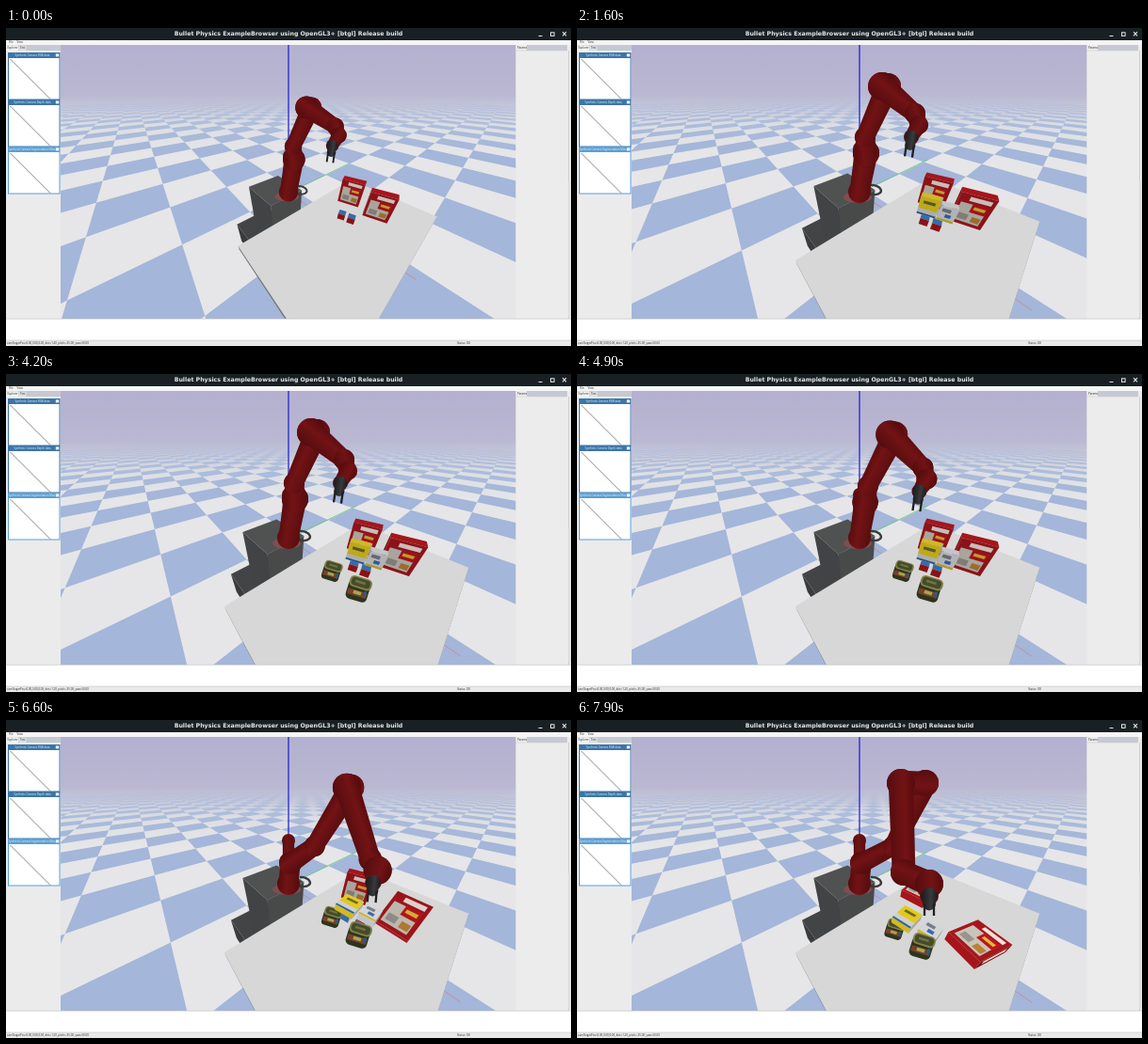
Write an HTML page with a canvas that moves like this. It is 600 px wide and 338 px high and loops after 8000 ms.

```html
<!DOCTYPE html>
<html lang="en">
<head>
<meta charset="utf-8">
<title>Physics browser</title>
<style>
html, body { margin: 0; width: 600px; height: 338px; overflow: hidden; background: #fff; }
canvas { display: block; width: 600px; height: 338px; }
</style>
</head>
<body>
<canvas id="stage"></canvas>
<script>
const LOOP = 8000, W = 600, H = 338;
const stage = document.getElementById('stage');
const c = stage.getContext('2d');
const dpr = Math.max(1, window.devicePixelRatio || 1);
stage.width = W * dpr;
stage.height = H * dpr;

// Camera: orbit around the origin, 90 degree field of view
const CX = 300, CY = 175, FOCAL = 163, NEAR_DIST = 1.2, FLOOR = -0.93;
const rad = Math.PI / 180;
const sinP = Math.sin(35 * rad), cosP = Math.cos(35 * rad);
const sinY = Math.sin(50 * rad), cosY = Math.cos(50 * rad);
let dist = NEAR_DIST;

const lerp = (a, b, k) => a + (b - a) * k;
const mix = (a, b, k) => a.map((v, i) => lerp(v, b[i], k));
const clamp = (v, lo = 0, hi = 1) => Math.min(hi, Math.max(lo, v));
const part = (t, from, to) => clamp((t - from) / (to - from));
const smooth = k => k * k * (3 - 2 * k);

// View-aligned ground coordinates: right, ahead, up
function view([r, g, z]) {
  const depth = Math.max(0.05, dist + g * cosP - z * sinP);
  const k = FOCAL / depth;
  return [CX + r * k, CY - (g * sinP + z * cosP) * k, depth];
}

const project = (x, y, z) => view([x * cosY + y * sinY, y * cosY - x * sinY, z]);

// Scale about the centre for a point placed at the nearest camera distance
const zoom = depth => depth / (depth + dist - NEAR_DIST);

function poly(points, fill) {
  c.beginPath();
  points.forEach(p => c.lineTo(p[0], p[1]));
  c.closePath();
  c.fillStyle = fill;
  c.fill();
}

function line(a, b, color, width) {
  c.beginPath();
  c.moveTo(a[0], a[1]);
  c.lineTo(b[0], b[1]);
  c.strokeStyle = color;
  c.lineWidth = width;
  c.stroke();
}

function rect(x, y, w, h, fill) {
  c.fillStyle = fill;
  c.fillRect(x, y, w, h);
}

function disc([x, y, r], fill) {
  c.beginPath();
  c.arc(x, y, r, 0, 7);
  c.fillStyle = fill;
  c.fill();
}

function label(str, x, y, font, fill = '#2a2a2a', align = 'left') {
  c.font = font;
  c.fillStyle = fill;
  c.textAlign = align;
  c.textBaseline = 'middle';
  c.fillText(str, x, y);
}

function ramp(x0, y0, x1, y1, ...stops) {
  const g = c.createLinearGradient(x0, y0, x1, y1);
  stops.forEach(([at, color]) => g.addColorStop(at, color));
  return g;
}

function drawFloor() {
  rect(58, 18, 484, 56, ramp(0, 18, 0, 74, [0, '#b4b0d0'], [1, '#bab8d2']));
  rect(58, 72, 484, 238, ramp(0, 72, 0, 135,
    [0, '#bab9d2'], [0.15, '#c2c4d8'], [0.5, '#dcdee4'], [1, '#e6e6e8']));
  for (let i = -28; i < 28; i++) {
    for (let j = -28; j < 28; j++) {
      if ((i + j) % 2 === 0) continue;
      const depth = project(i + 0.5, j + 0.5, FLOOR)[2];
      if (depth <= 0.06 || depth > 22) continue;
      c.globalAlpha = clamp(1.25 - depth / 18);
      poly([[i, j], [i + 1, j], [i + 1, j + 1], [i, j + 1]]
        .map(([x, y]) => project(x, y, FLOOR)), '#a4b6d9');
    }
  }
  c.globalAlpha = 1;
}

function block(x0, x1, y0, y1, z0, z1, left, front, top) {
  const p = project;
  poly([p(x0, y0, z0), p(x1, y0, z0), p(x1, y0, z1), p(x0, y0, z1)], left);
  poly([p(x1, y0, z0), p(x1, y1, z0), p(x1, y1, z1), p(x1, y0, z1)], front);
  poly([p(x0, y0, z1), p(x1, y0, z1), p(x1, y1, z1), p(x0, y1, z1)], top);
}

function drawStand() {
  block(-0.55, 0, -0.37, 0.1, FLOOR, -0.61, '#3a3b3c', '#424344', '#434445');
  block(-0.32, 0.05, -0.23, 0.12, FLOOR, 0, '#424344', '#484949', '#505151');
  const s = zoom(1.15);
  c.save();
  c.translate(CX, CY);
  c.scale(s, s);
  c.beginPath();
  c.ellipse(14, -3, 9, 5, 0.15, -1.9, 1.9);
  c.strokeStyle = '#3b3b3d';
  c.lineWidth = 2.4;
  c.stroke();
  c.beginPath();
  c.ellipse(-2, 5, 15, 6, 0, 0, 7);
  c.fillStyle = '#7c4f50';
  c.fill();
  c.restore();
}

function drawTable() {
  block(0.24, 0.95, -0.6, 0.64, -0.03, 0.005, '#77787a', '#8b8c8d', '#d7d7d7');
}

const RED = ['#550b0d', '#721315', '#641012'];
const DARK = ['#1b1b1d', '#3a3a3d', '#28282a'];

function limb(a, b, tones) {
  const dx = b[0] - a[0], dy = b[1] - a[1], len = Math.hypot(dx, dy) || 1;
  const nx = -dy / len, ny = dx / len, r = Math.max(a[2], b[2]);
  const mx = (a[0] + b[0]) / 2, my = (a[1] + b[1]) / 2;
  const fill = ramp(mx - nx * r, my - ny * r, mx + nx * r, my + ny * r,
    [0, tones[0]], [0.4, tones[1]], [0.7, tones[2]], [1, tones[0]]);
  const edge = (p, k) => [p[0] + nx * p[2] * k, p[1] + ny * p[2] * k];
  disc(a, fill);
  disc(b, fill);
  poly([edge(a, 0.88), edge(b, 0.88), edge(b, -0.88), edge(a, -0.88)], fill);
}

// The arm swings down to the boxes, then pulls back and folds
function drawArm(t) {
  const swing = smooth(part(t, 4600, 5700)), pull = part(t, 5700, 7900);
  const fold = pull * pull;
  const path = (up, reach, end) => mix(mix(up, reach, swing), end, pull);
  const shoulder = mix([307, 133], [302, 152], swing);
  const middle = path([306, 116], [322, 134], [336, 134]);
  const elbow = path([327, 62], [369, 75], [357, 67]);
  const wrist = path([363, 103], [409, 150], [374, 174]);
  const lean = 1 - pull;
  const from = ([x, y], dx, dy) => [x + dx, y + dy];
  const place = ([x, y], r, depth) => {
    const s = zoom(depth);
    return [CX + (x - CX) * s, CY + (y - CY) * s, r * s];
  };

  const spread = 13 * fold + 3 * (1 - swing);
  const joints = [
    place([300, 174], 12, 1.18),
    place(shoulder, lerp(14, 12, swing), 1.05),
    place(middle, 11, 1),
    place(from(elbow, spread, 0), 14, 0.8),
    place(from(elbow, -spread, 0), 15, 0.8),
    place(from(wrist, -4 - 23 * fold, -12), 11 + 3 * pull, 1.05),
    place(wrist, lerp(10, 15, swing), 1.1)
  ];
  const hand = place(from(wrist, -8 * lean, 13), 8 + pull * 2, 1.1);
  const tip = place(from(wrist, -11 * lean, 34), 0, 1.1);

  const s = zoom(1.05);
  limb([CX, CY - 24 * s, 7 * s], [CX, CY - 47 * s, 7 * s], RED);
  for (let n = 1; n < joints.length; n++) limb(joints[n - 1], joints[n], RED);

  // Wrist, dark hand and two fingers
  const dx = tip[0] - hand[0], dy = tip[1] - hand[1], len = Math.hypot(dx, dy);
  const grip = [hand[0] + dx * 0.4, hand[1] + dy * 0.4];
  limb(joints[6], hand, RED);
  limb([hand[0], hand[1], hand[2] * 0.9], [...grip, hand[2] * 0.7], DARK);
  for (const side of [-0.5, 0.5]) {
    const ox = -dy / len * side * hand[2], oy = dx / len * side * hand[2];
    line(from(grip, ox, oy), from(tip, ox, oy), '#202022', 2.3 * s);
  }
}

// Panels on a front face in unit coordinates: x, y, w, h, colour
const PACKET_ART = [
  [0.1, 0.28, 0.78, 0.62, '#c9c4bb'], [0.3, 0.07, 0.6, 0.13, '#eee0dc'],
  [0.45, 0.26, 0.45, 0.28, '#bd161c'], [0.52, 0.34, 0.32, 0.1, '#e2b83c'],
  [0.18, 0.62, 0.3, 0.2, '#98948e'], [0.6, 0.66, 0.25, 0.18, '#b98134']];
const CARTON_ART = [
  [0, 0, 1, 0.65, '#e2c91f'], [0.2, 0.2, 0.6, 0.16, '#6a6a2a'], [0, 0.9, 1, 0.1, '#2b62a8']];
const SUGAR_ART = [
  [0.15, 0.15, 0.5, 0.22, '#777c88'], [0.4, 0.5, 0.35, 0.22, '#3a69b0'], [0, 0.86, 1, 0.14, '#d0b52c']];

// Each box stands at one place and tips over onto its back at another
const packet = {
  size: [0.164, 0.213, 0.06], colors: ['#7d1014', '#a5161b', '#a5171c'], art: PACKET_ART, spine: '#eee2dd'
};
const cube = { size: [0.048, 0.048, 0.048], colors: ['#b9bcc0', '#356ba9', '#a3161a'], art: [], tip: [5700, 6600] };
const leftPacket = { ...packet, from: [0.503, -0.137, 0.106], to: [0.42, -0.13, 0.03], yaw: [-31, -45], tip: [6600, 7800] };
const rightPacket = { ...packet, from: [0.643, -0.312, 0.106], to: [0.57, -0.53, 0.03], yaw: [-31, -68], tip: [5500, 7500] };
const cubes = [
  { ...cube, from: [0.39, -0.32, 0.025], to: [0.27, -0.4, 0.025], yaw: [-28, -45] },
  { ...cube, from: [0.445, -0.36, 0.025], to: [0.34, -0.47, 0.025], yaw: [-28, -45] }];
const carton = {
  size: [0.105, 0.13, 0.04], colors: ['#aaa99f', '#d2b920', '#cfcfcb'], art: CARTON_ART,
  from: [0.405, -0.29, 0.112], to: [0.256, -0.406, 0.06], yaw: [-28, -45], tip: [5700, 6600]
};
const sugar = {
  size: [0.085, 0.105, 0.045], colors: ['#94979b', '#c2c5c8', '#d3d5d7'], art: SUGAR_ART,
  from: [0.495, -0.337, 0.1], to: [0.349, -0.491, 0.05], yaw: [-28, -45], tip: [5700, 6600]
};

function unit(v) {
  const len = Math.hypot(...v);
  return v.map(n => n / len);
}

function drawBox(box, t, lift = 0) {
  const k = smooth(part(t, ...box.tip));
  const centre = mix(box.from, box.to, part(t, 5700, 7900));
  const a = lerp(...box.yaw, k) * rad, cos = Math.cos(a), sin = Math.sin(a);
  const right = [cos, sin, 0];
  const down = unit(mix([0, 0, -1], [sin, -cos, 0], k));
  const back = unit(mix([-sin, cos, 0], [0, 0, -1], k));
  const axes = [right, down, back];
  const at = p => view(centre.map((v, i) => v + (i === 2 ? lift : 0) +
    axes.reduce((sum, axis, n) => sum + axis[i] * box.size[n] * (p[n] - 0.5), 0)));

  // A patch on the side of one axis, spanned by the next two axes
  const patch = (n, side, u, v, w, h) =>
    [[u, v], [u + w, v], [u + w, v + h], [u, v + h]].map(([p, q]) => {
      const point = [];
      point[n] = side;
      point[(n + 1) % 3] = p;
      point[(n + 2) % 3] = q;
      return at(point);
    });

  for (let n = 0; n < 3; n++) {
    for (const side of [0, 1]) {
      const quad = patch(n, side, 0, 0, 1, 1), [p, q, , s] = quad;
      const area = (q[0] - p[0]) * (s[1] - p[1]) - (q[1] - p[1]) * (s[0] - p[0]);
      if ((side ? -area : area) <= 0) continue;
      poly(quad, box.colors[n]);
      if (n === 0 && side && box.spine) poly(patch(0, 1, 0.1, 0.25, 0.75, 0.45), box.spine);
      if (n === 2 && !side) {
        box.art.forEach(([x, y, w, h, fill]) => poly(patch(2, 0, x, y, w, h), fill));
        poly(quad, `rgba(0,0,0,${0.16 * (1 - k)})`);
      }
    }
  }
}

function drawCan([x, y], size, drop) {
  c.save();
  c.translate(x, y - drop);
  c.rotate(0.3);
  c.scale(size, size);
  const shape = (px, py, w, h, r, fill) => {
    c.beginPath();
    c.roundRect(px, py, w, h, r);
    c.fillStyle = fill;
    c.fill();
  };
  shape(-10, -6, 19, 17, 4, '#2c351d');
  shape(-9, 2, 17, 5, 1, '#79402a');
  rect(-4, 2.5, 7, 3, '#a8a650');
  rect(5, 1, 2.5, 5, '#31587a');
  shape(-10, -10, 20, 10, 4, '#828145');
  shape(-8.5, -8.8, 17, 7.2, 3, '#454b2b');
  rect(-5, -6.5, 9, 2, '#6f7344');
  c.restore();
}

// Draws a part from its start time on, passing the height left to fall
function dropIn(t, start, time, height, drawPart) {
  if (t >= start) drawPart(height * (1 - part(t, start, start + time) ** 2));
}

function drawScene(t) {
  c.save();
  c.beginPath();
  c.rect(58, 18, 483.5, 291);
  c.clip();
  drawFloor();
  const o = project(0, 0, 0);
  line(o, project(1, 0, 0), '#d98286', 0.8);
  line(o, project(0, 1, 0), '#6ccb84', 0.9);
  line(o, [CX, 0], '#2626d0', 1.3);
  drawStand();
  drawTable();

  const pushed = part(t, 6600, 7900);
  drawBox(leftPacket, t);
  drawArm(t);
  drawBox(rightPacket, t);
  dropIn(t, 2300, 300, 28, h => drawCan(mix([346.5, 209], [338, 222], pushed), 0.98, h));
  cubes.forEach(b => drawBox(b, t));
  dropIn(t, 700, 200, 0.12, h => drawBox(carton, t, h));
  dropIn(t, 1300, 200, 0.12, h => drawBox(sugar, t, h));
  dropIn(t, 3400, 400, 30, h => drawCan(mix([375, 228], [367, 240], pushed), 1.22, h));
  c.restore();
}

const TINY = '2.9px "Open Sans", sans-serif';

function drawPreview(y, title, head) {
  rect(2, y, 55.5, 50.5, head);
  rect(3, y + 6, 53.5, 43.5, '#fff');
  line([4.5, y + 7], [47, y + 49.5], '#555', 0.7);
  c.save();
  c.beginPath();
  c.rect(3, y, 49, 6);
  c.clip();
  label(title, 28, y + 3.1, TINY, '#e9f1f8', 'center');
  c.restore();
  rect(52.8, y + 1.4, 3.4, 3, '#f2f5f8');
}

function drawPanels() {
  rect(0, 0, W, 13, '#192024');
  label('Bullet Physics ExampleBrowser using OpenGL3+ [btgl] Release build',
    300, 6.5, 'bold 6.26px "DejaVu Sans", sans-serif', '#e6e6e6', 'center');
  line([565.5, 8.5], [569.5, 8.5], '#e6e6e6', 1);
  c.strokeRect(578.5, 4.8, 3.6, 3.6);
  line([591, 4.2], [595, 8.4], '#e6e6e6', 1.1);
  line([595, 4.2], [591, 8.4], '#e6e6e6', 1.1);

  rect(0, 13, W, 5, '#f5f5f5');
  label('File', 3, 15.4, TINY);
  label('View', 11.5, 15.4, TINY);

  rect(0, 18, 58, 291, '#ebebeb');
  rect(0, 18, 58, 6, '#c6c9d3');
  rect(0, 18.5, 13, 5.5, '#f5f5f5');
  rect(13.5, 18.8, 8, 5.2, '#dfe1e6');
  label('Explorer', 1.5, 21.3, TINY);
  label('Test', 15, 21.3, TINY);
  ['RGB data', 'Depth data', 'Segmentation Mask'].forEach((name, i) =>
    drawPreview(26 + 50 * i, 'Synthetic Camera ' + name, i < 2 ? '#3b75a8' : '#5a9fd4'));

  rect(541.5, 18, 58.5, 291, '#ececec');
  rect(553, 18, 43, 6, '#c6c9d3');
  line([541.5, 24], [596, 24], '#c4c4c4', 0.5);
  line([597.5, 24], [597.5, 309], '#cfcfcf', 1);
  rect(597, 163, 2, 143, '#dedede');
  label('Params', 543, 21.3, TINY);

  rect(0, 309, W, 23, '#fff');
  line([0, 309.2], [W, 309.2], '#b9b9b9', 0.6);
  rect(0, 332, W, 6, '#e9e9e9');
  line([0, 332], [W, 332], '#b5b5b5', 0.5);
  label(`camTargetPos=0.00,0.00,0.00, dist=${dist.toFixed(2)}, pitch=-35.00, yaw=50.00`, 1, 335.1, TINY);
  label('Status: OK', 479, 335.1, TINY);
}

function draw(now) {
  const t = now % LOOP;
  dist = t < 500 ? 1.4 : t < 1100 ? 1.3 : NEAR_DIST;
  c.setTransform(dpr, 0, 0, dpr, 0, 0);
  drawScene(t);
  drawPanels();
}

const start = performance.now();
function tick() {
  draw(performance.now() - start);
  requestAnimationFrame(tick);
}
tick();
</script>
</body>
</html>
```
